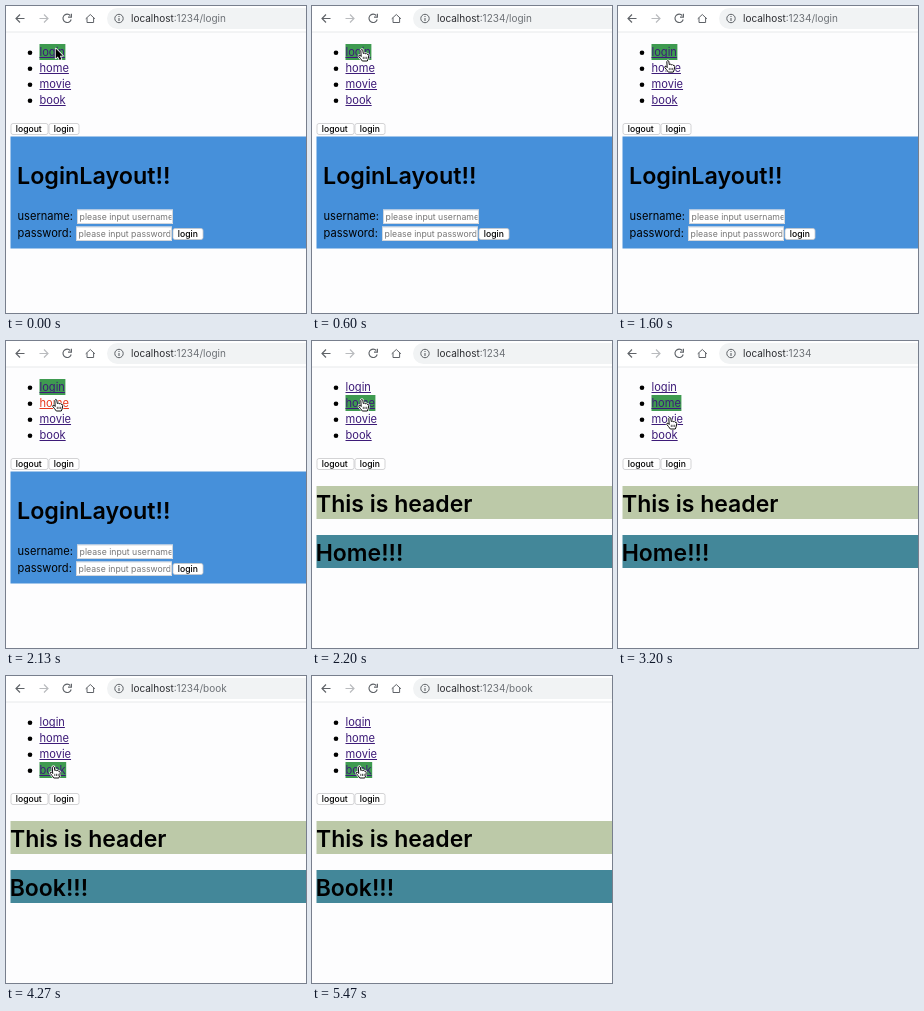
These frames come from a looping animation (300 by 307 pixels, 5.59 s). An HTML page with a canvas:

```html
<!DOCTYPE html>
<html lang="en">
<head>
<meta charset="utf-8">
<title>Route demo</title>
<style>
html, body { margin: 0; width: 100%; height: 100%; overflow: hidden; background: #fdfdfe; }
canvas { display: block; width: 100vw; height: 100vh; }
</style>
</head>
<body>
<canvas id="stage"></canvas>
<script>
const W = 300, H = 307, LOOP = 5590, STEP = 1000 / 15;
const canvas = document.getElementById('stage');
const ctx = canvas.getContext('2d');
const LINKS = ['login', 'home', 'movie', 'book'];

// Each route becomes active at its time.
const ROUTES = [[0, 'login'], [2190, 'home'], [3525, 'movie'], [4190, 'book']];
// Mouse button held on a link: start, end, link.
const PRESSES = [[2060, 2190, 'home'], [3395, 3525, 'movie'], [4060, 4190, 'book']];
// Pointer position: time, x, y.
const PATH = [
  [0, 46, 42.5], [1200, 46, 42.5], [1800, 46, 57.5], [2730, 46, 57.5],
  [3200, 48, 75.5], [3600, 48, 75.5], [4000, 43.5, 89.5], [LOOP, 43.5, 89.5]
];
const ARROW_UNTIL = 600;

const HAND = new Path2D('M3.2 8 L2.8 1.8 Q3.8 0 4.8 1.6 L5.3 5 Q6.4 4 7.2 5.2 Q8.4 4.4 9 5.7 ' +
  'Q10.6 5.3 10.7 7 Q10.7 10 9.3 12.5 L4.3 12.5 Q2.6 10 .8 8 Q.6 6.2 2.1 6.7 Z');
const FOLDS = new Path2D('M5.3 8.3 V10.5 M7 8.3 V10.5 M8.7 8.3 V10.5');
const ARROW = new Path2D('M0 0 V10 L2.2 8 L3.9 11.5 L5.7 10.7 L4.2 7.3 H7.2 Z');

function text(str, x, y, size, color = '#000', weight = 400) {
  ctx.font = `${weight} ${size}px Inter, "Noto Sans", sans-serif`;
  ctx.fillStyle = color;
  ctx.fillText(str, x, y);
  return ctx.measureText(str).width;
}

function rect(x, y, w, h, color) {
  ctx.fillStyle = color;
  ctx.fillRect(x, y, w, h);
}

function line(d, color, width = 1.15) {
  ctx.strokeStyle = color;
  ctx.lineWidth = width;
  ctx.stroke(new Path2D(d));
}

function button(label, x, y, w) {
  ctx.beginPath();
  ctx.roundRect(x + 0.5, y + 0.5, w - 1, 11, 2);
  ctx.fillStyle = '#fff';
  ctx.fill();
  ctx.strokeStyle = '#c8c8cb';
  ctx.lineWidth = 0.8;
  ctx.stroke();
  text(label, x + 5.3, y + 9, 8.6, '#000', 500);
}

function input(hint, x, y) {
  rect(x, y, 96, 14.5, '#fff');
  ctx.strokeStyle = '#c6ccd4';
  ctx.lineWidth = 0.8;
  ctx.strokeRect(x + 0.5, y + 0.5, 95, 13.5);
  ctx.save();
  ctx.beginPath();
  ctx.rect(x + 2, y, 92.5, 14.5);
  ctx.clip();
  text(hint, x + 2.6, y + 10.3, 8.7, '#757575');
  ctx.restore();
}

function toolbar(route) {
  const gray = '#5f6368';
  rect(0, 0, W, 26, '#fff');
  rect(0, 25.5, W, 1, '#e8e9eb');
  ctx.beginPath();
  ctx.roundRect(101, 2, 230, 21, 10.5);
  ctx.fillStyle = '#f1f3f4';
  ctx.fill();
  ctx.save();
  ctx.translate(0, -0.5);
  line('M18.5 13 H10 M14 9 L10 13 L14 17', gray);
  line('M33.5 13 H42 M38 9 L42 13 L38 17', '#b9bbbe');
  line('M64.3 10 A4.2 4.2 0 1 0 65.2 14', gray);
  line('M65.4 8.2 V11.6 H62', gray);
  line('M79.7 13.3 L84.3 9 L88.9 13.3 M81 12.3 V17 H87.6 V12.3', gray, 1);
  line('M117.2 13 A4.2 4.2 0 1 1 108.8 13 A4.2 4.2 0 1 1 117.2 13', gray, 1);
  line('M113 12.5 V15.5 M113 10.5 V11.6', gray, 1.1);
  const w = text('localhost', 125, 16.5, 10, '#2b2c30');
  text(':1234' + (route === 'home' ? '' : '/' + route), 125 + w, 16.5, 10, '#6d7176');
  ctx.restore();
}

function menu(route, pressed) {
  LINKS.forEach((name, i) => {
    const y = 38 + i * 16;
    ctx.font = '11.1px Inter, "Noto Sans", sans-serif';
    if (name === route) rect(33.5, y, ctx.measureText(name).width + 0.5, 16, '#3e9a50');
    ctx.beginPath();
    ctx.arc(24, y + 8.8, 2.3, 0, Math.PI * 2);
    ctx.fillStyle = '#000';
    ctx.fill();
    const color = name === pressed ? '#e8391d' : '#3d1b78';
    const w = text(name, 33.5, y + 12, 11.1, color);
    rect(33.5, y + 13, w, 1, color);
  });
  button('logout', 4.5, 117, 38);
  button('login', 42.5, 117, 31);
}

function loginPage() {
  rect(4.5, 130.5, W, 112, '#4690da');
  text('LoginLayout!!', 11, 178, 23.3, '#000', 600);
  text('username:', 11.5, 214, 11.1);
  text('password:', 11.5, 231, 11.1);
  input('please input username', 71, 203.5);
  input('please input password', 70, 220.5);
  button('login', 166.5, 222, 31);
}

function contentPage(route) {
  rect(4.5, 145, W, 33, '#bcc9a8');
  text('This is header', 4, 170.5, 23, '#000', 600);
  rect(4.5, 194, W, 33, '#438799');
  text(route[0].toUpperCase() + route.slice(1) + '!!!', 3.7, 219.5, 23, '#000', 600);
}

function pointer(t) {
  const i = PATH.findIndex((p, n) => n > 0 && t <= p[0]);
  const [t0, x0, y0] = PATH[i - 1], [t1, x1, y1] = PATH[i];
  const u = (t - t0) / (t1 - t0), k = u * u * (3 - 2 * u);
  const arrow = t < ARROW_UNTIL;
  const shape = arrow ? ARROW : HAND;
  ctx.save();
  ctx.translate(x0 + (x1 - x0) * k + (arrow ? 3.7 : 0), y0 + (y1 - y0) * k);
  ctx.lineJoin = 'round';
  ctx.strokeStyle = '#fff';
  ctx.lineWidth = arrow ? 1.6 : 2;
  ctx.stroke(shape);
  ctx.fillStyle = arrow ? '#000' : '#fff';
  ctx.fill(shape);
  if (!arrow) {
    ctx.strokeStyle = '#111';
    ctx.lineWidth = 1;
    ctx.stroke(shape);
    ctx.lineWidth = 0.7;
    ctx.stroke(FOLDS);
  }
  ctx.restore();
}

function draw(now) {
  const raw = now % LOOP;
  const t = Math.min(Math.floor((raw + 5) / STEP) * STEP, LOOP);
  const route = ROUTES.filter(r => t >= r[0]).pop()[1];
  const press = PRESSES.find(p => t >= p[0] && t < p[1]);
  const ratio = window.devicePixelRatio || 1;
  const w = Math.round(innerWidth * ratio), h = Math.round(innerHeight * ratio);
  if (canvas.width !== w || canvas.height !== h) {
    canvas.width = w;
    canvas.height = h;
  }
  ctx.setTransform(w / W, 0, 0, h / H, 0, 0);
  rect(0, 0, W, H, '#fdfdfe');
  toolbar(route);
  menu(route, press && press[2]);
  if (route === 'login') loginPage();
  else contentPage(route);
  pointer(t);
}

let start;
function tick(now) {
  start ??= now;
  draw(now - start);
  requestAnimationFrame(tick);
}
draw(0);
requestAnimationFrame(tick);
</script>
</body>
</html>
```
